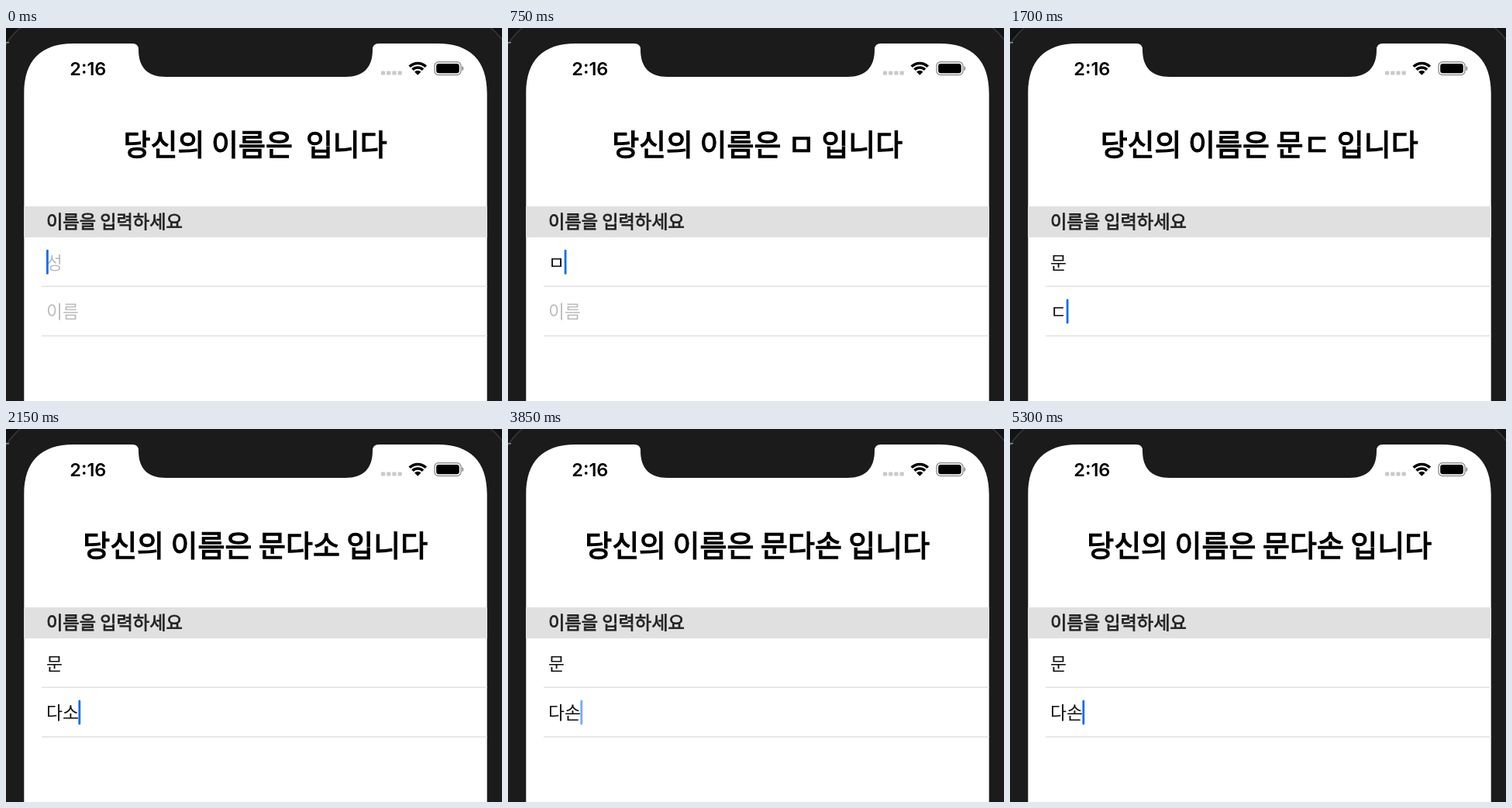
An HTML page with a canvas for the animation above (5800 ms loop, 640x481 px).

```html
<!DOCTYPE html>
<html lang="ko">
<head>
<meta charset="utf-8">
<style>
  html, body { margin: 0; width: 100%; height: 100%; overflow: hidden; background: #1b1b1b; }
  canvas { display: block; }
</style>
</head>
<body>
<canvas id="stage" width="640" height="481"></canvas>
<script>
const ctx = document.getElementById('stage').getContext('2d');
const LOOP = 5800, STEP = 50;
const HANGUL = '"Noto Sans CJK KR", "Noto Sans CJK", sans-serif';
const CENTER = 322;

// [time, family name, given name]
const typing = [
  [0, '', ''], [750, 'ㅁ', ''], [850, '무', ''], [1000, '문', ''],
  [1700, '문', 'ㄷ'], [1850, '문', '다'], [2050, '문', '닷'],
  [2150, '문', '다소'], [2300, '문', '다손']
];

// [start time, caret opacity for each following step]
const caretFades = [
  [0, 1], [400, 0.7, 0.3, 0], [750, 1],
  [1450, 0.3, 0.5, 0.7, 0.85, 1],
  [2850, 0.78, 0.38, 0], [3200, 0.3, 0.7, 1],
  [3850, 0.58, 0.2, 0], [4200, 0.35, 0.75, 1],
  [4850, 0.45, 0.12, 0], [5200, 0.4, 0.8, 1]
];

const latest = (list, t) => list.filter(item => item[0] <= t).pop();

function caretOpacity(t) {
  const [start, ...levels] = latest(caretFades, t);
  return levels[Math.min(levels.length - 1, Math.floor((t - start) / STEP))];
}

function text(str, x, y, font, color, align = 'left') {
  ctx.font = font;
  ctx.fillStyle = color;
  ctx.textAlign = align;
  ctx.fillText(str, x, y);
}

// Semibold: the regular weight thickened by a thin outline.
function semibold(str, x, y, size, color, align) {
  text(str, x, y, `400 ${size}px ${HANGUL}`, color, align);
  ctx.strokeStyle = color;
  ctx.lineWidth = size * 0.034;
  ctx.strokeText(str, x, y);
}

function box(x, y, w, h, color, r = 0) {
  ctx.fillStyle = color;
  ctx.beginPath();
  ctx.roundRect(x, y, w, h, r);
  ctx.fill();
}

function drawDevice() {
  box(0, 0, 640, 481, '#121314');
  box(-14, -21, 672, 600, '#1b1b1b', 90);
  ctx.strokeStyle = '#343638';
  ctx.lineWidth = 1.5;
  ctx.stroke();
  box(0, 18, 4, 1.5, '#8c8c8c');

  // Screen outline with the notch; the right half mirrors the left.
  ctx.fillStyle = '#fff';
  for (const side of [1, -1]) {
    ctx.save();
    ctx.translate(CENTER, 0);
    ctx.scale(side, 1);
    ctx.beginPath();
    ctx.moveTo(1, 481);
    ctx.lineTo(-298.7, 481);
    ctx.lineTo(-298.7, 84);
    ctx.bezierCurveTo(-298.7, 42, -277, 20, -235, 20);
    ctx.lineTo(-159, 20);
    ctx.quadraticCurveTo(-151, 20, -151, 28);
    ctx.bezierCurveTo(-151, 51, -139, 63, -116, 63);
    ctx.lineTo(1, 63);
    ctx.fill();
    ctx.restore();
  }
}

function drawStatusBar() {
  text('2:16', 82.3, 60.5, '600 23.5px Inter, sans-serif', '#000');
  for (let i = 0; i < 4; i++) box(484 + i * 7.2, 55.4, 5.2, 5.2, '#c9c9cb', 1.2);

  // Wi-Fi: two bands and a wedge around one centre.
  const cx = 531.3, cy = 60.7, spread = 0.77;
  ctx.strokeStyle = ctx.fillStyle = '#000';
  ctx.lineWidth = 3.6;
  for (const r of [15.2, 9.7]) {
    ctx.beginPath();
    ctx.arc(cx, cy, r, -Math.PI / 2 - spread, -Math.PI / 2 + spread);
    ctx.stroke();
  }
  ctx.beginPath();
  ctx.moveTo(cx, cy);
  ctx.arc(cx, cy, 6, -Math.PI / 2 - spread, -Math.PI / 2 + spread);
  ctx.fill();

  ctx.strokeStyle = '#929292';
  ctx.lineWidth = 1.4;
  ctx.beginPath();
  ctx.roundRect(553, 43.7, 34, 16.8, 5);
  ctx.stroke();
  box(555.2, 45.9, 29.6, 12.4, '#000', 3.2);
  box(588.3, 49.3, 2, 5.6, '#929292', [0, 2, 2, 0]);
}

function drawField(value, hint, y) {
  text(value || hint, 52, y + 8.5, `400 22.8px ${HANGUL}`, value ? '#111' : '#bcbcbe');
  box(46, y + 30.6, 575, 1.5, '#e2e2e4');
}

function drawCaret(value, y, opacity) {
  ctx.globalAlpha = opacity;
  box(52 + value.length * 20.7, y - 16.2, 2.8, 32, '#0f6cf0', 1.4);
  ctx.globalAlpha = 1;
}

function draw(t) {
  const [, family, given] = latest(typing, t);
  drawDevice();
  drawStatusBar();
  semibold(`당신의 이름은 ${family}${given} 입니다`, CENTER - 0.3, 163.8, 38, '#000', 'center');
  box(23, 230, 598, 40, '#e0e0e0');
  semibold('이름을 입력하세요', 52, 258.3, 23.2, '#222');
  drawField(family, '성', 302);
  drawField(given, '이름', 365.7);
  if (t < 1450) drawCaret(family, 302, caretOpacity(t));
  else drawCaret(given, 365.7, caretOpacity(t));
}

const begin = performance.now();
function tick() {
  const t = (performance.now() - begin) % LOOP;
  draw(Math.floor(t / STEP) * STEP);
  requestAnimationFrame(tick);
}
tick();
</script>
</body>
</html>
```
